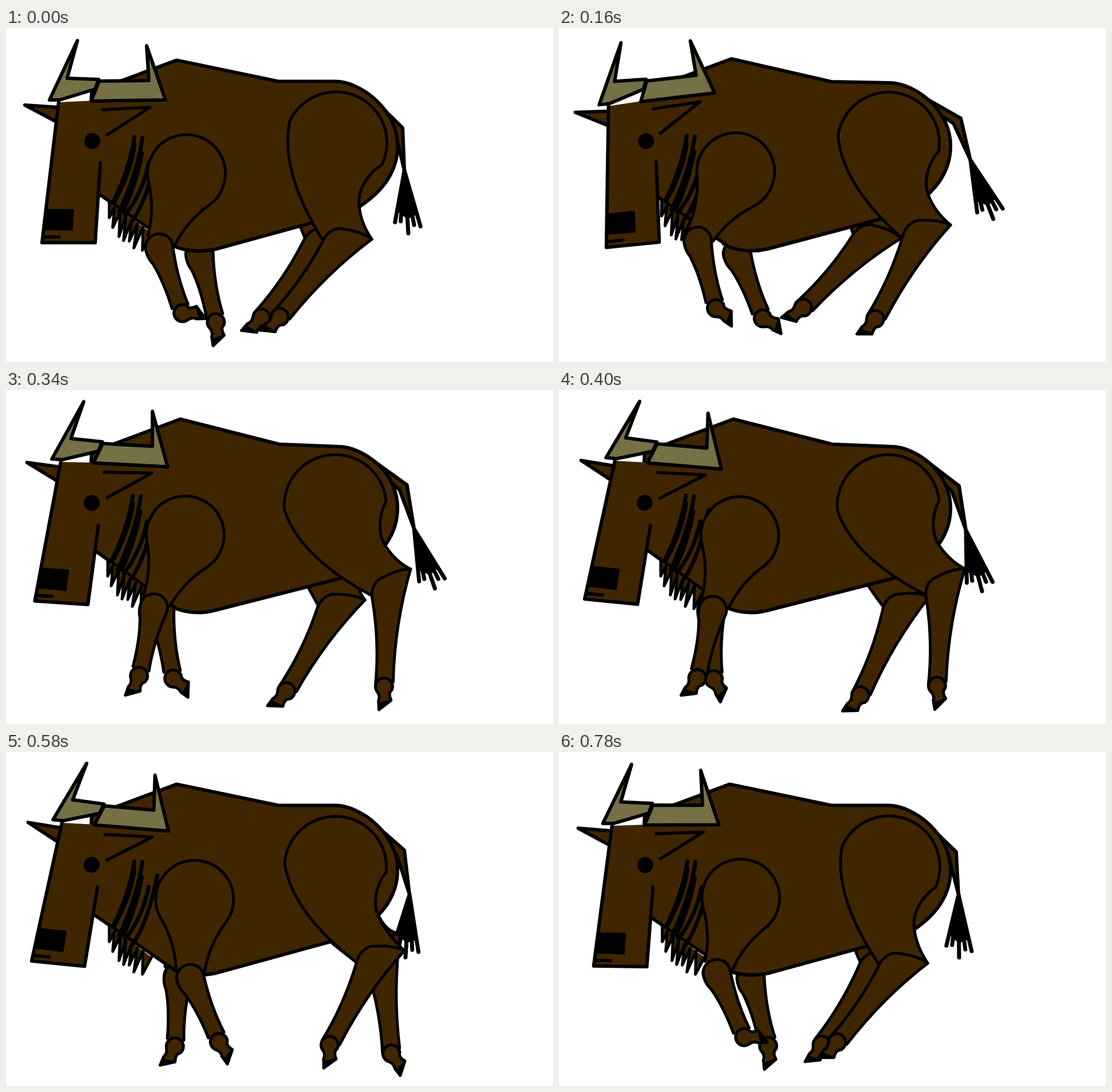
Write an HTML page with a canvas that moves like this. It is 957 by 585 pixels and loops after 0.8 s.

```html
<!DOCTYPE html>
<html>
<head>
<meta charset="utf-8">
<title>Walking wildebeest</title>
<style>
  html, body { margin: 0; height: 100%; overflow: hidden; background: #fff; }
  canvas { display: block; }
</style>
</head>
<body>
<canvas id="stage" width="957" height="585"></canvas>
<script>
const ctx = document.getElementById('stage').getContext('2d');
const LOOP = 800, STEP = 20;
const HIDE = '#402600', HORN = '#757045', INK = '#000';
const RAD = Math.PI / 180;

// Pose times in ms; every track below has one value per time.
const times = [0, 160, 260, 400, 580, 700, 780];
const tracks = {
  head: [0, -5.85, -.7, 5.6, 5.6, 2.45, .7],
  lift: [.1, .5, 1, 1, .1, 0, .1],
  tail: {
    bendX: [694, 703, 703, 700, 697, 696, 695],
    bendY: [175, 158, 163, 168, 172, 173, 175],
    rootX: [697, 720, 717, 712, 706, 701, 699],
    rootY: [250, 232, 240, 246, 250, 250, 250],
    swing: [3.6, 21.2, 22.4, 14.8, -3.7, -4.7, .5]
  },
  nearFore: {
    upper: [-20.6, -29.2, -26.7, -20, -3.4, -6, -18],
    shin: [19.2, 15, -7, -12.6, 24.1, 34.8, 22.8],
    hoof: [85, 49, 0, -35, 29, 80, 85]
  },
  farFore: {
    upper: [1.6, -6.8, -15.8, -20.9, -10, -1.8, .6],
    shin: [13.6, 21.5, 21, 1.9, -2.3, 9.4, 14.6],
    hoof: [1.5, 58, 65, 24, -30, -6, -1]
  },
  nearHind: {
    upper: [5.7, 22.6, 32, 36.8, 26.2, 15.5, 7.7],
    hockX: [640, 685, 700, 710, 697, 668, 645],
    hockY: [370, 345, 321, 313, 348, 360, 370],
    shin: [-49.8, -38.7, -12.6, -13.4, -38.5, -44.8, -48.9],
    hoof: [-48, -42, -22, 3, -6, -27, -42]
  },
  farHind: {
    upper: [-3.2, -5.6, -3.6, 11.4, 30, 9.7, -1.5],
    hockX: [606, 599, 605, 648, 690, 641, 610],
    hockY: [369, 368, 370, 362, 318, 359, 365],
    shin: [-49, -54.7, -46.7, -35, -4.4, -34, -45.6],
    hoof: [-49, -57, -46, -40, 30, -8, -36]
  }
};

// Periodic cubic interpolation that never overshoots a pose.
function sample(values, t) {
  const n = times.length;
  const time = i => times[(i + n) % n] + LOOP * Math.floor(i / n);
  const value = i => values[(i + n) % n];
  const slope = i => (value(i + 1) - value(i)) / (time(i + 1) - time(i));
  const tangent = i => {
    const a = slope(i - 1), b = slope(i);
    if (a * b <= 0) return 0;
    const before = time(i) - time(i - 1), after = time(i + 1) - time(i);
    const mean = (a * after + b * before) / (before + after);
    return Math.sign(mean) * Math.min(Math.abs(mean), 3 * Math.abs(a), 3 * Math.abs(b));
  };
  let i = n - 1;
  while (times[i] > t) i--;
  const span = time(i + 1) - time(i), u = (t - time(i)) / span, v = 1 - u;
  return value(i) * v * v * (1 + 2 * u) + value(i + 1) * u * u * (3 - 2 * u)
    + span * u * v * (tangent(i) * v - tangent(i + 1) * u);
}

const pose = (track, t) => Array.isArray(track)
  ? sample(track, t)
  : Object.fromEntries(Object.entries(track).map(([name, part]) => [name, pose(part, t)]));

function shape(path, fill, width) {
  const p = new Path2D(path);
  if (fill) { ctx.fillStyle = fill; ctx.fill(p); }
  if (width) { ctx.lineWidth = width; ctx.stroke(p); }
}

// Draws in a frame at (x, y) whose y axis leans right by the given degrees.
function at(x, y, lean, draw) {
  ctx.save();
  ctx.translate(x, y);
  ctx.rotate(-lean * RAD);
  draw();
  ctx.restore();
}

function drawHoof() {
  shape('M-6 42L-8 26Q-5 18 -11 11A15 15 0 1 1 14 6Q7 12 14 24Z', HIDE, 5);
  shape('M-6 31L14 24L-6 42Z', INK, 3);
}

function drawForeleg(leg) {
  at(333, 209, leg.upper, () => {
    shape('M-25 174Q-30 127 -56 87.5A68 68 0 1 1 56 87.5Q30 127 25 174', HIDE, 5);
    ctx.translate(0, 186);
    ctx.rotate((leg.upper - leg.shin) * RAD);
    shape('M15 112Q12 60 24 3A24 24 0 0 0 -24 0Q-25 14 -20 24Q-12 60 -14 110', HIDE, 5);
    at(0, 123, leg.hoof - leg.shin, drawHoof);
  });
}

function drawHindleg(x, y, leg) {
  const dx = leg.hockX - x, dy = leg.hockY - y;
  const cos = Math.cos(leg.upper * RAD), sin = Math.sin(leg.upper * RAD);
  const hock = [dx * cos - dy * sin, dx * sin + dy * cos];
  at(x, y, leg.upper, () => shape('M-41 165Q-105 35 -78 -49A89 89 0 1 1 75 43' +
    `C50 55 28 82 28 108Q27 140 ${hock}`, HIDE, 5));
  at(leg.hockX, leg.hockY, leg.shin, () => {
    shape('M14 200Q-6 100 0 0Q-22 5 -44 25C-56 32 -62 50 -52 70Q-24 140 -15 212', HIDE, 5);
    at(0, 210, leg.hoof - leg.shin, drawHoof);
  });
}

function drawTail({ bendX, bendY, rootX, rootY, swing }) {
  shape(`M640 122L${bendX} ${bendY}L${rootX} ${rootY}L${bendX - 13} ${bendY + 9}L655 145`, HIDE, 6);
  at(rootX, rootY, swing, () => {
    shape('M0 0L-17 70L0 85L17 78Z', INK);
    shape('M0 0L-22 89M0 0L-12 88M0 0L0 110M0 0L11 96M0 0L22 99', null, 7);
  });
}

function drawBody(k) {
  shape(`M150 ${112 - 3 * k}L${298 + 7 * k} ${57 - 6 * k}L${475 + 3 * k} ${93 + 2 * k}` +
    `L${575 + 5 * k} ${93 + 6 * k}C${622 + 4 * k} ${93 + 6 * k} 686 145 685 207` +
    `C685 250 660 285 620 312L600 ${323 + 3 * k}L365 ${388 - 2 * k}` +
    `Q330 395 298 ${384 - k}L140 ${276 - 6 * k}Z`, HIDE, 6);
}

function drawMane(k) {
  at(-3 * k, -7 * k, 0, () => {
    shape('M181 306L181 333L190 315L187 350L200 323L198 366L210 330L206 373L220 337' +
      'L216 374L230 344L224 386L240 350L239 390L255 360', HIDE, 5);
    shape('M225 192Q216 250 187 307M239 193Q230 255 198 322M225 205Q220 250 190 305' +
      'M250 237Q239 290 209 328M265 217Q250 295 222 338M238 220Q228 275 205 322', null, 7);
  });
}

function drawHead(angle) {
  at(155, 186, -angle, () => {
    ctx.translate(-155, -186);
    shape('M92 139L33 135L88 164', HIDE, 6);
    shape('M92 130L63 376L156 376L165 236L177 187L200 125Z', HIDE);
    shape('M92 130L63 376L156 376L165 236', null, 6);
    shape('M169 143L252 139L177 187', HIDE, 5.5);
    shape('M125 22L107 88L162 90L156 107L94 126L76 126Z', HORN, 6);
    shape('M246 31L250 92L163 93L149 128L279 126Z', HORN, 6);
    shape('M70 319L117 319L115 353L67 352Z', INK, 4);
    shape('M66 366H93', null, 6);
    shape('M137 198a14 14 0 1 0 28 0a14 14 0 1 0 -28 0', INK);
  });
}

function draw(now) {
  const p = pose(tracks, Math.floor(now % LOOP / STEP) * STEP);
  ctx.fillStyle = '#fff';
  ctx.fillRect(0, 0, 957, 585);
  ctx.strokeStyle = INK;
  ctx.lineJoin = ctx.lineCap = 'round';
  drawTail(p.tail);
  drawHindleg(575, 210, p.farHind);
  drawForeleg(p.farFore);
  drawBody(p.lift);
  drawMane(p.lift);
  drawHindleg(579, 204, p.nearHind);
  drawForeleg(p.nearFore);
  drawHead(p.head);
}

const start = performance.now();
function tick() {
  draw(performance.now() - start);
  requestAnimationFrame(tick);
}
tick();
</script>
</body>
</html>
```
